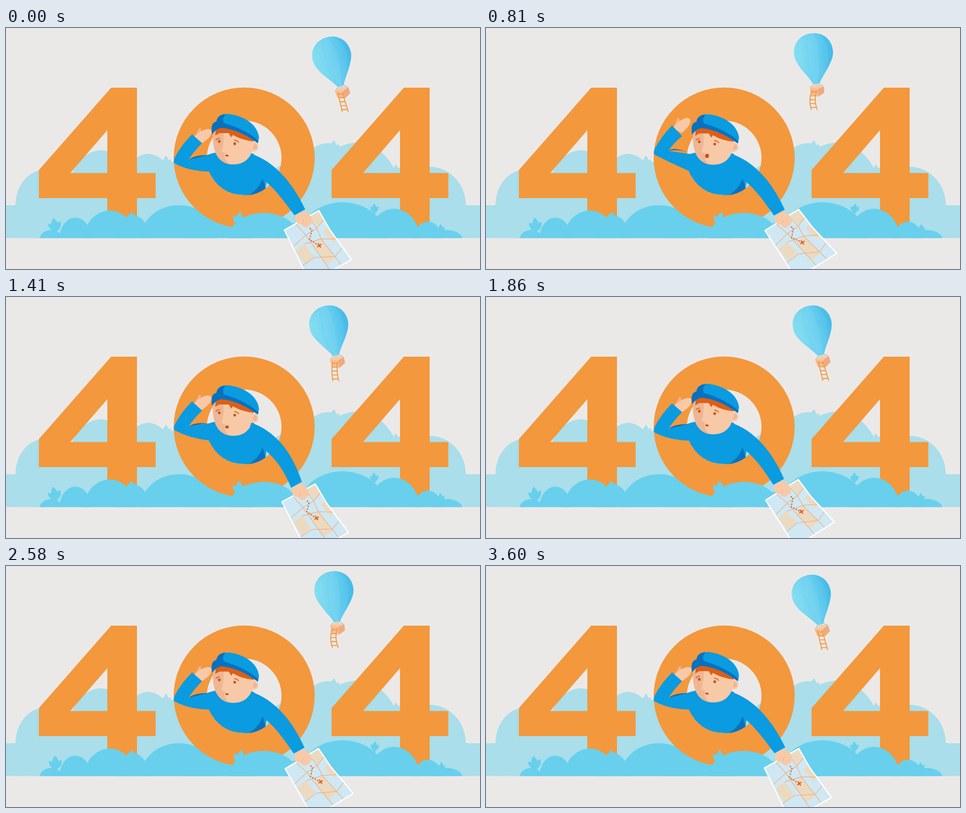
Recreate the animation shown at these times as an HTML page with a canvas. Size 800x408 px, loop 3630 ms.

```html
<!DOCTYPE html>
<html lang="en">
<head>
<meta charset="utf-8">
<title>404</title>
<style>
  html, body { margin: 0; width: 100%; height: 100%; overflow: hidden; background: #ebe9e8; }
  canvas { display: block; width: 800px; height: 408px; }
</style>
</head>
<body>
<canvas id="stage" width="800" height="408"></canvas>
<script>
const ctx = document.getElementById('stage').getContext('2d');
const LOOP = 3630, SWAY = LOOP / 2, TAU = Math.PI * 2, GROUND = 355.5;
const C = {
  bg: '#ebe9e8', back: '#a9deea', bush: '#68d0ec', orange: '#f3983c',
  blue: '#0a9be1', navy: '#0572c0', skin: '#f8c9a6', shade: '#f0b592',
  hair: '#dc5f17', brown: '#c4581f', sand: '#ecdac0', road: '#f1b083'
};

const mix = (a, b, k) => a.map((v, i) => v + (b[i] - v) * k);
const ease = k => (1 - Math.cos(Math.PI * Math.min(1, Math.max(0, k)))) / 2;
const pulse = (t, from, full, hold, end) => ease((t - from) / (full - from)) * ease((end - t) / (end - hold));
const wave = (t, peak) => Math.cos(TAU * (t - peak) / SWAY);

function shape(color, d) {
  ctx.fillStyle = color;
  ctx.fill(new Path2D(d), 'evenodd');
}
function line(color, width, d) {
  ctx.strokeStyle = color;
  ctx.lineWidth = width;
  ctx.stroke(new Path2D(d));
}
function oval(color, x, y, rx, ry = rx, turn = 0) {
  ctx.fillStyle = color;
  ctx.beginPath();
  ctx.ellipse(x, y, rx, ry, turn, 0, TAU);
  ctx.fill();
}
function rect(color, x, y, right, bottom) {
  ctx.fillStyle = color;
  ctx.fillRect(x, y, right - x, bottom - y);
}
function at(x, y, angle, draw) {
  ctx.save();
  ctx.translate(x, y);
  ctx.rotate(angle);
  draw();
  ctx.restore();
}
// A row of rounded mounds, each given by its peak and half width
function ridge(color, base, ...mounds) {
  ctx.save();
  ctx.beginPath();
  ctx.rect(0, 0, 800, GROUND);
  ctx.clip();
  for (const [x, top, half] of mounds) {
    oval(color, x, base, half, base - top);
    rect(color, x - half, base, x + half, GROUND);
  }
  ctx.restore();
}
function tuft(color, x, y, size, angle = 0) {
  for (const side of [-1, 0, 1]) {
    const h = size * (1 - .2 * Math.abs(side)), w = h * .28;
    at(x, y, angle + side * .7, () =>
      shape(color, `M0 4C${-w * 1.5} ${-h * .3} ${-w} ${-h * .7} 0 ${-h}C${w} ${-h * .7} ${w * 1.5} ${-h * .3} 0 4Z`));
  }
}

function drawClouds() {
  rect(C.back, 0, 300, 800, GROUND);
  ridge(C.back, 300, [66, 240, 50], [160, 207, 60], [240, 213, 50], [284, 226, 40]);
  ridge(C.back, 300, [485, 228, 60], [543, 195, 62], [592, 194, 78], [668, 238, 32], [715, 235, 61]);
  tuft(C.back, 270, 233, 17);
  tuft(C.back, 553, 208, 18);
  tuft(C.back, 658, 244, 13);
}
function drawFour(x) {
  at(x, 0, 0, () => shape(C.orange,
    'M177.500 101H221V245.500H252.500V288H221V348H171V288H55.500V240.500ZM171 173V245.500H108.500Z'));
}
function drawZero() {
  ctx.fillStyle = C.orange;
  ctx.beginPath();
  ctx.arc(402, 219.8, 119, 0, TAU);
  ctx.arc(402, 219.8, 63, 0, TAU, true);
  ctx.fill();
}
function drawLeftBush(sway) {
  ridge(C.bush, 357, [76, 342, 19], [117, 321, 27], [175, 309, 43], [214, 317, 28], [292, 300, 65], [360, 325, 60]);
  tuft(C.bush, 84, 342, 21, sway - .15);
  tuft(C.bush, 212, 323, 12, sway);
}
function drawRightBush(sway) {
  ridge(C.bush, 357, [397, 331, 22], [435, 313, 60], [487, 330, 30], [568, 295, 74], [655, 306, 43], [712, 328, 24], [744, 342, 26]);
  tuft(C.bush, 393, 332, 21, sway + .15);
  tuft(C.bush, 622, 311, 14, sway);
  tuft(C.bush, 734, 345, 13, sway);
}

function drawBalloon(t) {
  const tilt = (11 + 5.7 * wave(t, -70)) * Math.PI / 180;
  const x = 550.4 - 5.6 * wave(t, 1390);
  const y = 45 - 3.3 * wave(t, 735);
  at(x, y, -tilt, () => {
    const tone = ctx.createLinearGradient(-33, 0, 33, 0);
    tone.addColorStop(0, '#86dff1');
    tone.addColorStop(.5, '#62cdee');
    tone.addColorStop(1, '#43bae9');
    shape(tone, 'M-33 0C-33 -44 33 -44 33 0C33 18 14 36 5 53H-5C-14 36 -33 18 -33 0Z');
    for (const w of [25, 9]) {
      shape('rgba(255,255,255,.05)', `M0 -33C${-w * 1.3} -28 ${-w * 1.3} 18 -2 53H2C${w * 1.3} 18 ${w * 1.3} -28 0 -33Z`);
    }
    line('#55b9dc', .8, 'M-5 53L-11 58M-2 53V62M2 53V62M5 53L11 58');
    at(0, 65, 0, () => {
      shape('#f8cba7', 'M-12 -8L0 -11L12 -7L1 -3Z');
      shape('#f5bd95', 'M-12 -8L1 -3V10L-11 5Z');
      shape('#edab80', 'M1 -3L12 -7V4L1 10Z');
    });
  });
  drawLadder(x + 65 * Math.sin(tilt) - 8.5, y + 65 * Math.cos(tilt) - 1, t);
}
function drawLadder(x, y, t) {
  const swing = 2.7 + 6 * wave(t, 160);
  const bend = 1.6 * (wave(t, 0) - 1);
  const rail = (side, k) => [x + side * (8 + 2 * k) + swing * k + 4 * bend * k * (1 - k), y + 33 * k];
  ctx.strokeStyle = C.orange;
  ctx.lineWidth = 1.6;
  ctx.beginPath();
  for (const side of [0, 1]) {
    for (let k = 0; k <= 1.01; k += .1) ctx[k ? 'lineTo' : 'moveTo'](...rail(side, k));
  }
  for (let k = .08; k < 1; k += .2) {
    ctx.moveTo(...rail(0, k));
    ctx.lineTo(...rail(1, k));
  }
  ctx.stroke();
}

// The arm lifts as a whole, fading out towards the shoulder
function drawRaisedArm(raise) {
  const p = (x, y) => `${x} ${y - 15 * raise * Math.min(1, (345 - x) / 18)} `;
  at(317 - raise, 186 - 16 * raise, -.12 * raise, () => {
    shape(C.shade, 'M2 -3L9 -16C12 -17 13 -15 12 -11L18 -8L11 4Z');
    shape(C.skin, 'M0 -1C6 -8 15 -14 24 -15C29 -15 31 -12 30 -8C28 0 20 4 13 10Z');
  });
  shape(C.blue, `M${p(314, 180)}L${p(331, 195)}Q${p(317, 209)}${p(308, 223)}L${p(344, 214)}L${p(345, 243)}` +
    `Q${p(310, 243)}${p(284, 229)}Q${p(282, 226)}${p(285, 219)}Q${p(296, 198)}${p(314, 180)}Z`);
  shape(C.navy, `M${p(308, 223)}Q${p(318, 215)}${p(341, 215)}Q${p(326, 219)}${p(308, 223)}Z`);
}
function drawTorso() {
  shape(C.blue, 'M338 216C355 207 395 207 418 213L440 258L438 271Q426 282 406 283Q360 284 341 240Z');
  shape(C.navy, 'M409 283Q426 275 433 254L438 272Q425 281 409 283Z');
}
function drawReachingArm([dx, dy]) {
  shape(C.blue, `M414 213C450 225 482 258 ${505 + dx} ${307 + dy}L${487 + dx} ${317 + dy}C470 295 456 273 433 256L408 232Z`);
}
function drawHead(dy, open) {
  at(0, dy, 0, () => {
    oval(C.skin, 418, 201, 8);
    oval(C.shade, 420, 201, 3.5, 4.5);
    const face = new Path2D('M350 176C347 202 354 231 384 231C405 231 418 216 419 190L390 168Z');
    ctx.fillStyle = C.skin;
    ctx.fill(face);
    ctx.save();
    ctx.clip(face);
    shape(C.shade, 'M345 165H366C369 185 367 198 364 207Q363 211 370 211C366 219 373 226 378 233H340Z');
    ctx.restore();
    shape(C.hair, 'M355 168L353 182L360 178L376 178L380 185L383 181Q398 190 418 192L421 184L382 165Z');
    oval(C.brown, 360, 192, 2.4);
    oval(C.brown, 386, 196, 2.4);
    line(C.hair, 1.5, 'M354 190Q357 186 361 187M385 190Q390 190 393 194');
    oval('#c7521d', 373, 216, 3 + .3 * open, 1.6 + 2 * open, .2);
    shape(C.blue, 'M348 179C346 164 350 159 356 158C355 149 366 144 379 146C405 150 426 166 427 186L425 195C410 183 386 170 363 168C355 170 352 174 348 179Z');
    shape(C.navy, 'M348 180C345 164 350 159 355 159C356 150 363 146 371 146C365 151 366 157 368 161C392 168 412 178 426 191L425 195C409 183 387 171 364 169C356 170 352 175 348 180Z');
  });
}

function drawMap({ raise, dip, drift }) {
  const tl = [470 - 6 * dip + 2 * drift, 342 + 3 * dip + 2 * drift];
  const tr = [528 - 5 * dip - drift, 309 + 8 * dip - 2 * raise];
  const br = [583 - 11 * dip + 5 * drift + 7 * raise, 392 + 18 * dip - 11 * drift - 6 * raise];
  const bl = br.map((v, i) => v + 1.2 * (tl[i] - tr[i]));
  const fold = .4;
  const foldLeft = mix(tl, bl, fold), foldRight = mix(tr, br, fold);
  foldRight[0] -= 3;
  const point = (u, v) => v < fold
    ? mix(mix(tl, tr, u), mix(foldLeft, foldRight, u), v / fold)
    : mix(mix(foldLeft, foldRight, u), mix(bl, br, u), (v - fold) / (1 - fold));
  const path = (...uv) => {
    let d = '';
    for (let i = 0; i < uv.length; i += 2) d += (i ? 'L' : 'M') + point(uv[i], uv[i + 1]).join(' ');
    return d;
  };
  const field = (u, v, w, h) => shape(C.sand, path(u, v, u + w, v - .03, u + w + .04, v + h, u + .05, v + h + .03) + 'Z');
  const sheet = path(0, 0, 1, 0, 1, fold, 1, 1, 0, 1, 0, fold) + 'Z';
  shape('#cfe8f4', sheet);
  ctx.save();
  ctx.clip(new Path2D(sheet));
  field(.72, .02, .24, .18);
  field(.84, .36, .2, .22);
  field(.45, .48, .26, .36);
  field(.02, .4, .28, .24);
  line(C.road, 1.1, path(0, .32, .42, .26, .74, .25, 1, .18));
  line(C.road, 1.1, path(.32, 0, .42, .26, .45, .47, .5, 1));
  line(C.road, 1.1, path(.7, 0, .74, .25, .7, .45, .76, 1));
  line(C.road, 1.1, path(0, .68, .34, .66, .75, .82, 1, .75));
  line(C.road, 1.1, path(.3, .38, .7, .45, 1, .58));
  ctx.restore();
  line('#fff', 2.2, sheet);
  ctx.setLineDash([2.5, 2.2]);
  line('#da6527', 2, path(.59, .19, .61, .24, .45, .355, .56, .51));
  ctx.setLineDash([]);
  at(...point(.58, .53), .2, () => line('#d8551c', 1.8, 'M-3 -3L3 3M3 -3L-3 3'));
}
function drawMapHand([dx, dy]) {
  at(dx, dy, 0, () => {
    shape(C.skin, 'M488 317L504 309C510 315 518 320 517 327C516 332 513 333 511 335C507 340 501 337 499 332C492 333 487 329 488 317Z');
    line(C.shade, 1, 'M500 332Q503 328 502 324');
  });
}

function draw(t) {
  const sway = .1 * wave(t, 600);
  const pose = {
    raise: pulse(t, 150, 700, 900, 1650),
    dip: pulse(t, 950, 1380, 1440, 1850),
    drift: Math.sin(Math.PI * t / LOOP) ** 2
  };
  const wrist = [-4 * pose.dip - 2 * pose.drift, 5 * pose.dip + pose.drift];
  rect(C.bg, 0, 0, 800, 408);
  drawClouds();
  drawBalloon(t);
  drawFour(0);
  drawFour(494);
  drawLeftBush(sway);
  drawZero();
  drawRightBush(sway);
  drawTorso();
  drawRaisedArm(pose.raise);
  drawHead(2.8 * pose.dip + 1.4 * pose.drift, Math.min(1, 2 * pose.raise));
  drawMap(pose);
  drawMapHand(wrist);
  drawReachingArm(wrist);
}

ctx.lineJoin = 'round';
let start;
function tick(now) {
  start ??= now;
  draw(Math.floor((now - start) % LOOP / 30) * 30);
  requestAnimationFrame(tick);
}
draw(0);
requestAnimationFrame(tick);
</script>
</body>
</html>
```
